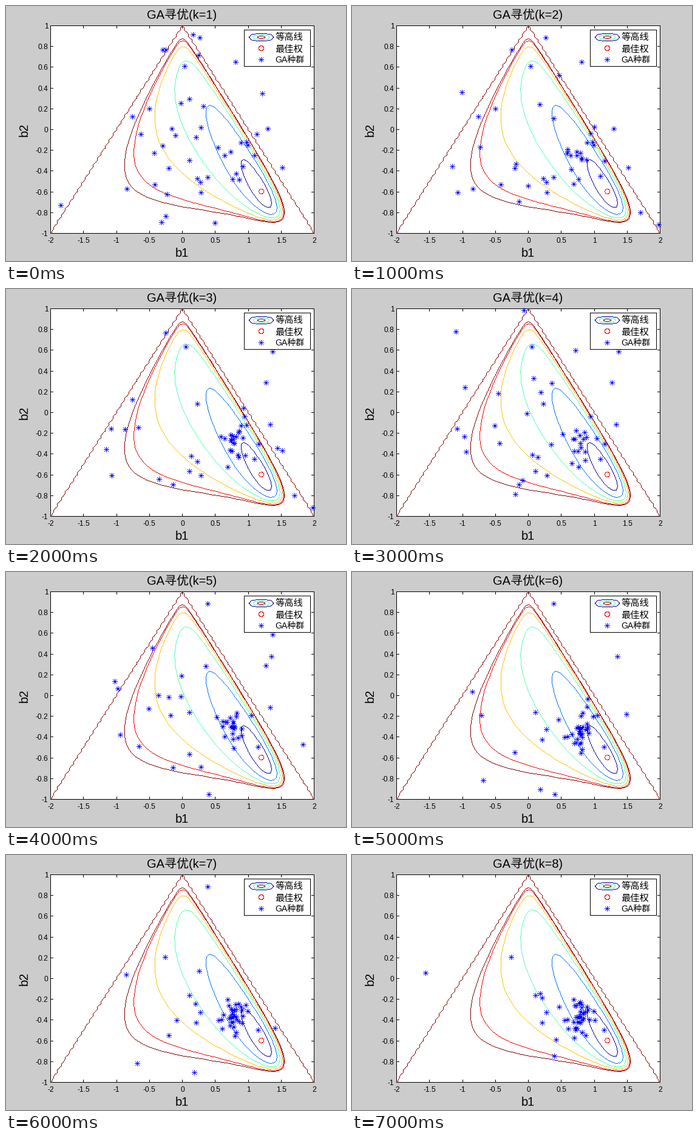
A matplotlib script for the animation above (8 s loop, 560 by 420 pixels).

```python
import numpy as np
import matplotlib.pyplot as plt
from matplotlib.animation import FuncAnimation
from matplotlib.colors import to_rgb

W, H, DPI = 560, 420, 100
PT = 72 / DPI                       # points per pixel
LEFT, RIGHT, TOP, BOTTOM = 73, 507, 32, 374
GENERATIONS, SIZE = 8, 47
DARK_RED = "#800000"
plt.rcParams["font.family"] = ["Liberation Sans", "Noto Sans CJK JP"]

fig = plt.figure(figsize=(W / DPI, H / DPI), dpi=DPI)
ax = fig.add_axes([0, 0, 1, 1])
ax.axis("off")


def px(b1):
    return LEFT + (b1 + 2) * (RIGHT - LEFT) / 4


def py(b2):
    return TOP + (1 - b2) * (BOTTOM - TOP) / 2


# --- hard-edged drawing on a pixel canvas ---
def stroke(canvas, xs, ys, color):
    """One-pixel polyline without smoothing."""
    xs, ys = (np.floor(np.asarray(v) + 0.5).astype(int) for v in (xs, ys))
    for x0, y0, x1, y1 in zip(xs, ys, xs[1:], ys[1:]):
        n = max(abs(x1 - x0), abs(y1 - y0)) + 1
        x = np.linspace(x0, x1, n).round().astype(int)
        y = np.linspace(y0, y1, n).round().astype(int)
        canvas[y, x] = to_rgb(color)


def box(canvas, x0, y0, x1, y1, edge="black"):
    canvas[y0:y1 + 1, x0:x1 + 1] = 1
    stroke(canvas, [x0, x1, x1, x0, x0], [y0, y0, y1, y1, y0], edge)


def oval(canvas, x, y, rx, ry, color):
    a = np.linspace(0, 2 * np.pi, 33)
    stroke(canvas, x + rx * np.cos(a), y + ry * np.sin(a), color)


def star(canvas, x, y):
    for dx, dy in ((4, 0), (0, 4), (3, 3), (3, -3)):
        stroke(canvas, [x - dx, x + dx], [y - dy, y + dy], "blue")


def label(x, y, text, size, **kw):
    kw = {"ha": "center", "va": "baseline", **kw}
    return ax.text(x, y, text, fontsize=size * PT, **kw)


# --- error surface of a two-pole filter around (1.2, -0.6) ---
def error(b1, b2):
    power = (1 - b2) / ((1 + b2) * ((1 - b2) ** 2 - b1 ** 2))
    h0, h1 = 0.0, 1.0
    g0, g1 = np.zeros_like(b1), np.ones_like(b1)
    cross = np.zeros_like(b1)
    for _ in range(70):
        cross += h1 * g1
        h0, h1 = h1, 1.2 * h1 - 0.6 * h0
        g0, g1 = g1, b1 * g1 + b2 * g0
    return 1.6 / 0.448 + power - 2 * cross


def grid(nx, ny):
    b1, b2 = np.meshgrid(np.linspace(-2, 2, nx), np.linspace(-1, 1, ny))
    return b1, b2, np.abs(b1) < 1 - b2 - 1e-9


def stroke_levels(canvas, b1, b2, z, levels, colors, step):
    lines = ax.contour(px(b1), py(b2), z, levels=levels)
    for segments, color in zip(lines.allsegs, colors):
        for seg in segments:
            path = np.vstack([seg[::step], seg[-1:]])
            stroke(canvas, path[:, 0], path[:, 1], color)
    lines.remove()


def draw_contours(canvas):
    b1, b2, stable = grid(435, 343)
    stable &= b2 > -1
    z = np.full(b1.shape, np.nan)
    z[stable] = error(b1[stable], b2[stable])
    colors = ["#00008f", "#0070ff", "#50ffaf", "#ffbf00", "#ef0000", DARK_RED]
    stroke_levels(canvas, b1, b2, np.ma.masked_invalid(z),
                  [0.5, 1.5, 2.5, 3.5, 4.5, 5], colors, 8)
    # A coarse mask gives the stepped edge of the stable region.
    b1, b2, stable = grid(134, 101)
    stroke_levels(canvas, b1, b2, stable.astype(float), [0.5], [DARK_RED], 1)


def draw_ticks(canvas):
    for v in np.linspace(-2, 2, 9):
        x = px(v)
        stroke(canvas, [x, x], [BOTTOM, BOTTOM - 4], "black")
        stroke(canvas, [x, x], [TOP, TOP + 4], "black")
        label(x, 390, f"{v:g}", 12)
    for i in range(-5, 6):
        y = py(i / 5)
        stroke(canvas, [LEFT, LEFT + 4], [y, y], "black")
        stroke(canvas, [RIGHT, RIGHT - 4], [y, y], "black")
        label(69, y + 4.5, f"{i / 5:g}", 12, ha="right")


def draw_legend(canvas):
    box(canvas, 392, 39, 501, 99)
    oval(canvas, 420, 51, 20, 6.4, "#00008f")
    oval(canvas, 420, 51, 13, 4, "#50ffaf")
    oval(canvas, 420, 51, 6, 2, DARK_RED)
    oval(canvas, 420, 69, 4, 4, "red")
    star(canvas, 420, 88)


# --- population: parents that live on, and seeded offspring ---
# x, y, first and last generation
ELITE = [(208, 182, 1, 3), (370, 240, 1, 3), (360, 246, 1, 3),
         (321, 307, 1, 4), (165, 264, 2, 3), (409, 280, 2, 4),
         (416, 255, 2, 4), (393, 210, 2, 4), (315, 189, 3, 4),
         (334, 366, 5, 6), (313, 276, 6, 8), (350, 272, 6, 8),
         (379, 292, 6, 8)]


def offspring(rng, k, n):
    """Scatter that gathers into a core as the generations pass."""
    t = (k - 1) / (GENERATIONS - 1)
    core = rng.normal((376, 252 + 10 * t), (14 - 5 * t, 22 - 8 * t), (n, 2))
    wide = rng.normal((300 + 40 * t, 212 + 45 * t),
                      (98 - 15 * t, 88 - 25 * t), (n, 2))
    pts = np.where(rng.random((n, 1)) < 0.7 * t ** 0.45, core, wide)
    x, y = pts.T
    inside = (x >= LEFT) & (x <= RIGHT) & (y >= TOP) & (y <= BOTTOM)
    return pts[inside]


def evolve(seed=12):
    rng = np.random.default_rng(seed)
    bred, history = np.empty((0, 2)), []
    for k in range(1, GENERATIONS + 1):
        elite = np.array([(x, y) for x, y, a, b in ELITE if a <= k <= b])
        kept = bred[rng.random(len(bred)) < 0.3]
        bred = np.vstack([kept, offspring(rng, k, 3 * SIZE)])
        bred = bred[:SIZE - len(elite)]
        history.append(np.vstack([elite, bred]))
    return history


backdrop = np.full((H, W, 3), 0.8)
box(backdrop, LEFT, TOP, RIGHT, BOTTOM)
draw_ticks(backdrop)
draw_contours(backdrop)
oval(backdrop, px(1.2), 305, 4, 4, "red")
history = evolve()

stage = ax.imshow(backdrop, interpolation="nearest", aspect="auto",
                  extent=(-0.5, W - 0.5, H - 0.5, -0.5))
ax.set_xlim(-0.5, W - 0.5)
ax.set_ylim(H - 0.5, -0.5)
title = label(289, 21, "", 20)
label(289, 413, "b1", 20)
label(39, 203, "b2", 20, rotation=90, ha="right", va="center")
for y, text, size in ((56, "等高线", 15.3), (75, "最佳权", 15.3),
                      (93, "GA种群", 14)):
    label(443, y, text, size, ha="left")


def update(i):
    canvas = backdrop.copy()
    for x, y in history[i]:
        star(canvas, x, y)
    draw_legend(canvas)
    stage.set_data(canvas)
    title.set_text(f"GA寻优(k={i + 1})")
    return stage, title


anim = FuncAnimation(fig, update, frames=GENERATIONS, interval=1000,
                     repeat=True, repeat_delay=0)
plt.show()
```
